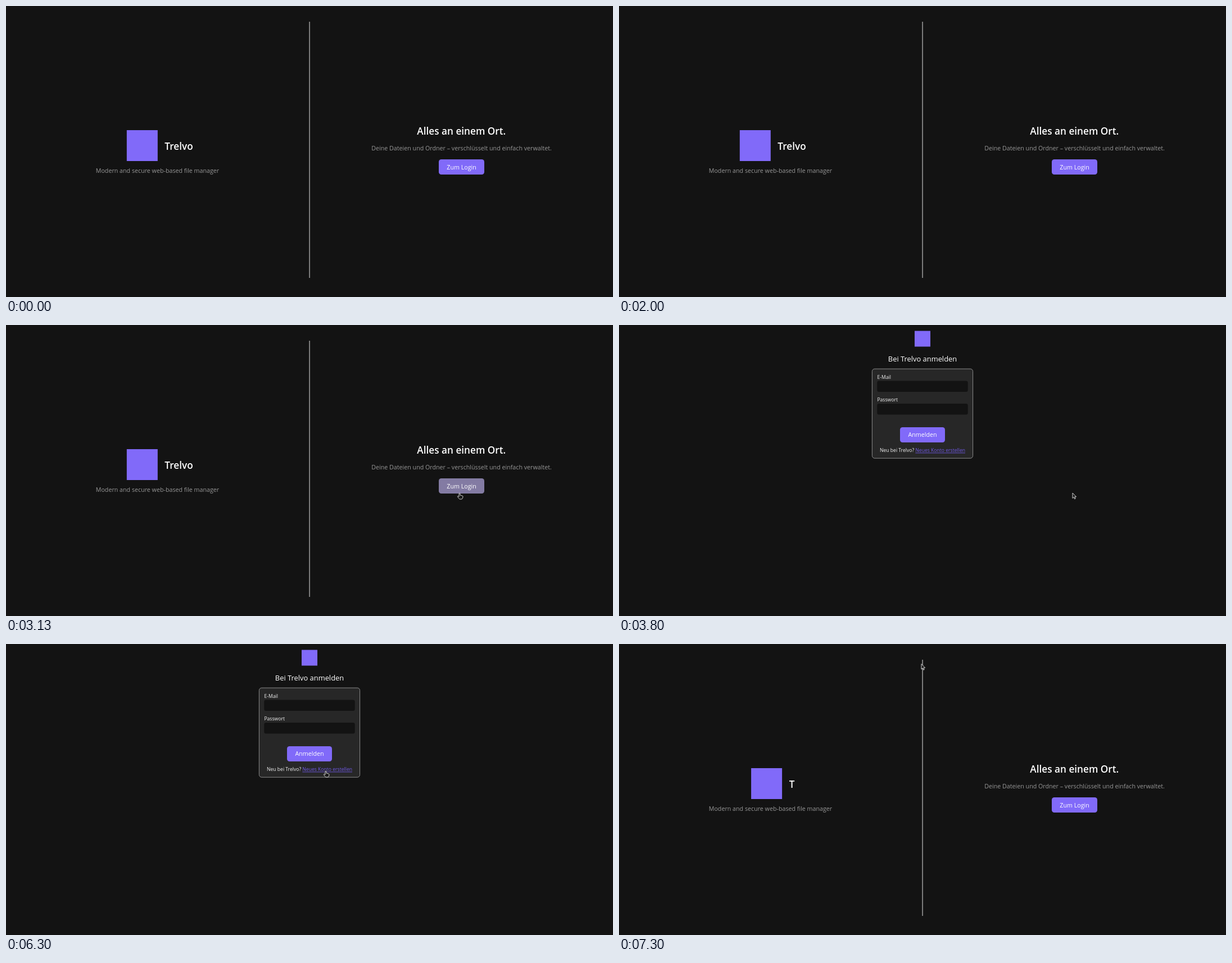
An HTML page that plays this animation: 1080x518 px, repeating every 8000 ms.

```html
<!DOCTYPE html>
<html lang="de">
<head>
<meta charset="utf-8">
<title>Trelvo</title>
<style>
  html, body { margin: 0; width: 100%; height: 100%; overflow: hidden; background: #131313; }
  svg { display: block; width: 100vw; height: 100vh; }
  text { font-family: "Open Sans", "Noto Sans", sans-serif; fill: #fff; }
  .mid { text-anchor: middle; }
  .head { font-size: 17.2px; font-weight: 600; }
  .sub { font-size: 10.7px; fill: #979797; }
  .btn { font-size: 10.7px; font-weight: 500; }
  .title { font-size: 12.9px; }
  .small { font-size: 8.6px; fill: #f2f2f2; }
  .link { fill: #7059e6; text-decoration: underline; }
  .brand { fill: #816af9; }
  .card { fill: #272727; stroke: #8c8c8c; stroke-width: 1; }
  .field { fill: #131313; }
  #cursor path { fill: #191919; stroke: #e4e4e4; stroke-width: .9; stroke-linejoin: round; }
</style>
</head>
<body>
<svg viewBox="0 0 1080 518">
  <g id="home">
    <rect x="539.5" y="28" width="1.1" height="456" fill="#d2d2d2"/>
    <rect id="mark" class="brand" y="221" width="55" height="55"/>
    <text id="name" class="head" y="255.5"></text>
    <text class="sub mid" x="269.5" y="296.5">Modern and secure web-based file manager</text>
    <text class="head mid" x="810.3" y="228.7">Alles an einem Ort.</text>
    <text class="sub mid" x="810.5" y="256.7">Deine Dateien und Ordner – verschlüsselt und einfach verwaltet.</text>
    <rect id="button" class="brand" x="770" y="273" width="81" height="27" rx="4.5"/>
    <text class="btn mid" x="810.6" y="290.5">Zum Login</text>
  </g>
  <g id="login"></g>
  <g id="signup"></g>
  <g id="cursor">
    <path id="arrow" d="M0 0V9.4L2.2 7.4L3.7 10.7L5.2 10L3.8 6.8H6.6Z"/>
    <path id="hand" d="M-1 .8Q0 -.5 1 .8V4L4.8 4.9Q6.2 5.3 6 7L5.3 9.4Q4.9 11 3 11H.8Q-.5 11 -1.4 9.6L-3.6 6.5Q-3.6 5.2 -2.3 5.6L-1 6.6Z"/>
  </g>
</svg>
<script>
const LOOP = 8000, NAME = "Trelvo";
const $ = id => document.getElementById(id);

const LOGIN_AT = 3170, SIGNUP_AT = 6600, HOME_AT = 7030;

// time, letters shown
const typed = [[0, 6], [700, 2], [730, 6], [HOME_AT, 1]];

// time, x, y of the pointer tip
const path = [
  [2300, 764, -12], [2530, 798, 190], [2730, 808, 302], [2840, 808, 302], [2870, 807, 299],
  [3800, 807, 299], [3900, 796, 309], [4080, 690, 268], [4330, 569, 226],
  [6600, 569, 226], [6670, 538, 35.5]
];

// time, pointer shape
const shapes = [[0, "arrow"], [2870, "hand"], [LOGIN_AT, "arrow"], [4270, "hand"], [6630, "arrow"]];

const stepAt = (table, t) => table.filter(row => row[0] <= t).pop();
const ease = p => p * p * (3 - 2 * p);

function pointAt(t) {
  const i = path.findIndex(row => row[0] > t);
  if (i < 0) return path[path.length - 1].slice(1);
  const [t0, x0, y0] = path[Math.max(i - 1, 0)], [t1, x1, y1] = path[i];
  const p = t < t0 ? 0 : ease((t - t0) / (t1 - t0));
  return [x0 + (x1 - x0) * p, y0 + (y1 - y0) * p];
}

function formPage(title, labels, action, note, link, bottom) {
  const fields = labels.map((label, i) => {
    const y = 99.5 + i * 40.5;
    return `<text class="small" x="459.4" y="${y - 3.9}">${label}</text>
      <rect class="field" x="459.3" y="${y}" width="161.4" height="19.5" rx="3"/>`;
  }).join("");
  return `<rect class="brand" x="526" y="10.5" width="28" height="28"/>
    <text class="title mid" x="540" y="65.3">${title}</text>
    <rect class="card" x="450.4" y="78.1" width="179.2" height="${bottom - 78.6}" rx="4.5"/>
    ${fields}
    <rect class="brand" x="500" y="${bottom - 55.7}" width="80" height="27" rx="4.5"/>
    <text class="btn mid" x="540" y="${bottom - 38.5}">${action}</text>
    <text class="small mid" x="540" y="${bottom - 11.3}">${note} <tspan class="link">${link}</tspan></text>`;
}

$("login").innerHTML = formPage(`Bei ${NAME} anmelden`, ["E-Mail", "Passwort"],
  "Anmelden", `Neu bei ${NAME}?`, "Neues Konto erstellen", 237.7);
$("signup").innerHTML = formPage("Neues Konto erstellen", ["E-Mail", "Passwort", "Passwort"],
  "Erstellen", `Schon bei ${NAME}?`, "Anmelden", 287.7);

function show(id, on) {
  $(id).style.display = on ? "" : "none";
}

function mixHover(p) {
  const from = [129, 106, 249], to = [131, 123, 163];
  return `rgb(${from.map((v, i) => Math.round(v + (to[i] - v) * p))})`;
}

function drawName(t) {
  const text = NAME.slice(0, stepAt(typed, t)[1]);
  if ($("name").textContent !== text) $("name").textContent = text;
  const left = 272.5 - (70 + $("name").getComputedTextLength()) / 2;
  $("mark").setAttribute("x", left + 2.5);
  $("name").setAttribute("x", left + 70);
}

function draw(t) {
  const home = t < LOGIN_AT || t >= HOME_AT;
  show("home", home);
  show("login", t >= LOGIN_AT && t < SIGNUP_AT);
  show("signup", t >= SIGNUP_AT && t < HOME_AT);
  if (home) {
    drawName(t);
    const hover = t < LOGIN_AT ? Math.min(Math.max((t - 2840) / 150, 0), 1) : 0;
    $("button").style.fill = mixHover(hover);
  }
  const [x, y] = pointAt(t), shape = stepAt(shapes, t)[1];
  show("cursor", t >= path[0][0]);
  show("arrow", shape === "arrow");
  show("hand", shape === "hand");
  $("cursor").setAttribute("transform", `translate(${x} ${y})`);
}

const start = performance.now();
function tick() {
  draw((performance.now() - start) % LOOP);
  requestAnimationFrame(tick);
}
tick();
</script>
</body>
</html>
```
